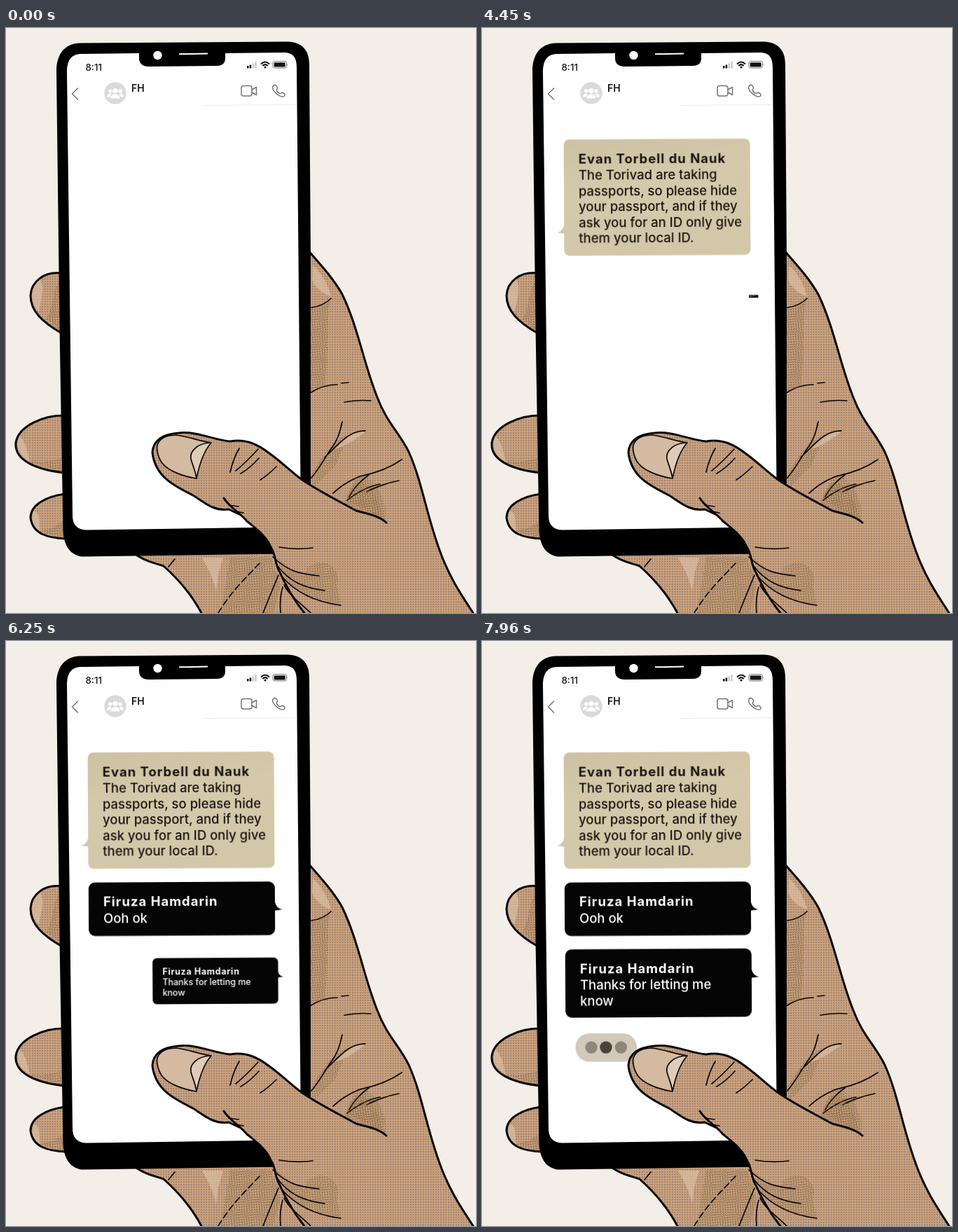
An HTML page for the animation above (8 s loop, 671 by 835 pixels).

```html
<!DOCTYPE html>
<html lang="en">
<head>
<meta charset="utf-8">
<title>Chat on a phone</title>
<style>
html, body { margin: 0; width: 100%; height: 100%; overflow: hidden; background: #f3eee7; }
svg { display: block; width: 100vw; height: 100vh; font-family: Inter, "Open Sans", sans-serif; }
.ink { fill: none; stroke: #080606; stroke-width: 3; stroke-linecap: round; stroke-linejoin: round; }
.thin { stroke-width: 1.7; }
.icon { fill: none; stroke: #77736f; stroke-width: 1.5; stroke-linejoin: round; stroke-linecap: round; }
.skin { fill: url(#skin); }
.shade { fill: url(#shade); }
.light { fill: #d8bda2; opacity: .75; }
.msg { font-size: 18.5px; font-weight: 500; }
.name { font-size: 18.5px; font-weight: 700; letter-spacing: 1px; }

.pop { animation: 8s linear infinite; }
#first { transform-origin: 107px 291px; animation-name: first; }
#second { transform-origin: 395px 383px; animation-name: second; }
#third { transform-origin: 396px 479px; animation-name: third; }
#typing { transform-origin: 134px 580px; animation-name: typing; }

@keyframes first {
  0% { transform: scale(0); animation-timing-function: step-end; }
  3.375% { transform: scale(.05); animation-timing-function: steps(3); }
  4.5% { transform: scale(.511); animation-timing-function: steps(3); }
  5.625%, 100% { transform: scale(1); }
}
@keyframes second {
  0% { transform: scale(0); animation-timing-function: step-end; }
  55.625% { transform: scale(.05); animation-timing-function: steps(3); }
  56.75% { transform: scale(.511); animation-timing-function: steps(3); }
  57.875%, 100% { transform: scale(1); }
}
@keyframes third {
  0% { transform: scale(0); animation-timing-function: step-end; }
  76.625% { transform: scale(.05); animation-timing-function: steps(3); }
  77.75% { transform: scale(.511); animation-timing-function: steps(3); }
  78.875%, 100% { transform: scale(1); }
}
@keyframes typing {
  0% { transform: scale(0); animation-timing-function: step-end; }
  97.625% { transform: scale(.05); animation-timing-function: steps(5); }
  99.5%, 100% { transform: scale(1); }
}
</style>
</head>
<body>
<svg viewBox="0 0 671 835" preserveAspectRatio="none">
  <defs>
    <pattern id="skin" width="3.6" height="3.6" patternUnits="userSpaceOnUse">
      <rect width="3.6" height="3.6" fill="#cba380"/>
      <circle cx="1.8" cy="1.8" r=".95" fill="#8c6d5d"/>
    </pattern>
    <pattern id="shade" width="5" height="5" patternUnits="userSpaceOnUse" patternTransform="rotate(35)">
      <path d="M0 1.2H3M2.5 3.7H5" stroke="#86683f" stroke-width="1.6" opacity=".7"/>
    </pattern>
    <linearGradient id="sand" x2=".3" y2="1">
      <stop offset="0" stop-color="#cdc1a3"/>
      <stop offset=".45" stop-color="#d5c9ab"/>
      <stop offset="1" stop-color="#d3c7a9"/>
    </linearGradient>
  </defs>
  <rect width="671" height="835" fill="#f3eee7"/>

  <!-- palm behind the phone -->
  <path class="skin" d="M431 317C449 338 467 357 480 380C503 428 511 480 530 527C543 562 561 577 575 605C594 647 600 695 620 748C633 784 650 809 667 835H279C264 807 243 784 225 768C212 763 202 763 186 752L380 700Z"/>
  <path class="shade" d="M434 398C445 398 455 394 462 390C457 420 462 460 455 512L434 520Z M500 640C515 635 520 645 530 655C540 675 545 690 541 704L485 672Z M320 755H378L392 795L382 835H306Z M434 642C450 610 470 585 490 580L470 625L440 655Z"/>
  <path class="light" d="M438 338C452 352 460 367 464 383C453 380 443 372 437 360Z M280 756H310L303 780L300 804C296 785 288 770 280 756Z M470 601C486 581 500 576 512 577C495 590 484 597 470 601Z"/>
  <path class="ink" d="M431 317C449 338 467 357 480 380C503 428 511 480 530 527C543 562 561 577 575 605C594 647 600 695 620 748C633 784 650 809 667 835M279 835C264 807 243 784 225 768C212 763 202 763 186 752"/>
  <path class="ink thin" d="M436 399C450 397 458 392 464 386M434 521C449 511 461 509 473 509M479 507L489 506M483 534C499 531 510 531 521 532M480 562C476 580 473 588 466 598C457 610 450 625 436 642M513 575C490 574 475 594 455 613M565 616C545 630 525 636 505 640C485 648 475 657 467 664M518 638C508 645 497 656 490 669M534 651C517 654 500 664 487 674M561 646C545 649 526 656 515 662M232 769L241 758"/>
  <path class="ink thin" stroke-dasharray="9 5" d="M362 764C342 785 320 806 303 835"/>

  <!-- fingers -->
  <g>
    <path class="skin" d="M80 350C54 347 36 362 35 382C35 404 52 420 80 436Z"/>
    <path class="skin" d="M82 553C55 553 18 567 14 592C12 616 40 630 84 635Z"/>
    <path class="skin" d="M84 665C56 669 35 681 35 699C38 722 59 728 86 729Z"/>
    <path class="shade" d="M80 360C65 365 70 400 57 415L80 434Z M82 612C62 620 45 619 32 619L82 634Z M84 700C73 713 58 716 48 719L84 728Z"/>
    <path class="light" d="M48 359C57 368 49 390 47 405C34 392 33 371 48 359Z M19 583C29 590 30 605 34 619C17 609 13 597 19 583Z M40 689C50 692 47 707 49 719C36 710 35 701 40 689Z"/>
    <path class="ink" d="M80 350C54 347 36 362 35 382C35 404 52 420 80 436M82 553C55 553 18 567 14 592C12 616 40 630 84 635M84 665C56 669 35 681 35 699C38 722 59 728 86 729"/>
  </g>

  <!-- phone -->
  <path d="M72 62C72 37 84 22 106 21.500L402 19.500C423 20 433 32 433 52L435 330V750L108 754.500C92 752 83 740 81.500 718L76.500 430Z"/>
  <path fill="#fff" d="M87 64C87 46 93 37 108 37L190 36V43C190 51 195 55 204 55L301 54C309 54 313 50 313 43V36L399 35C411 36 415 43 415 57L420.500 650V712L114 716.500C101 716 95 708 95 696L90 300Z"/>
  <circle cx="216.500" cy="39" r="6.200" fill="#fff"/>
  <path d="M247 37.300L288 36.500" stroke="#fff" stroke-width="2"/>

  <!-- status bar and header -->
  <g fill="#171513">
    <text x="113.500" y="61" font-size="13.300" font-weight="500">8:11</text>
    <text x="179" y="91" font-size="14" font-weight="600">FH</text>
    <path d="M344 54h2.500v3.500h-2.500zM347.700 52.500h2.500v5h-2.500z"/>
    <path fill="#c9c8c7" d="M351.500 50.500h2.500v7h-2.500zM355.300 48h2.500v9.500h-2.500z"/>
    <path fill="none" stroke="#171513" stroke-width="2" d="M364 51.500Q370 45.500 376 51.500M366.300 54Q370 50.300 373.700 54"/>
    <circle cx="370" cy="56" r="1.600"/>
    <rect x="381" y="47.500" width="19.500" height="9.500" rx="2.500" fill="none" stroke="#777"/>
    <rect x="382.700" y="49.200" width="16" height="6.200" rx="1.200"/>
    <path fill="#777" d="M401.500 50.500q1.500 1.700 0 3.500z"/>
  </g>
  <path class="icon" stroke-width="2" d="M102.500 86L94.500 94L102.500 102"/>
  <circle cx="156" cy="93" r="15.700" fill="#dadada"/>
  <g fill="#fff">
    <circle cx="156" cy="89.500" r="3.600"/>
    <circle cx="148.800" cy="90" r="2.700"/>
    <circle cx="163.200" cy="90" r="2.700"/>
    <path d="M149.500 100.500C149.500 92 162.500 92 162.500 100.500ZM144 98.500C144 93 149 93 150.500 94.500L148.500 98.500ZM168 98.500C168 93 163 93 161.500 94.500L163.500 98.500Z"/>
  </g>
  <g class="icon">
    <rect x="336" y="82.500" width="15" height="14.500" rx="3"/>
    <path d="M351 88L357.500 84.500V95.500L351 92"/>
    <path d="M381.500 82.500C384 80 386 82 387.500 85C388 87 385.500 87.500 386.500 89.500C388 92 390 93.500 391.500 93.500C393 93.500 393.500 91.500 395.500 92.500C398 94 399 96 397 97.500C392 101 377 88 381.500 82.500Z"/>
  </g>
  <path d="M283 110.500L413 109.500" stroke="#ecebea"/>

  <!-- messages -->
  <g id="first" class="pop">
    <g transform="rotate(-.3 250 242)">
      <rect x="117" y="158.500" width="266" height="166" rx="8" fill="url(#sand)"/>
      <path d="M118 276C117 285 113 290 107 291.500L119 293Z" fill="#d3c7a9"/>
      <g fill="#17130f">
        <text class="name" x="138" y="193.300">Evan Torbell du Nauk</text>
        <g class="msg">
          <text x="138" y="216">The Torivad are taking</text>
          <text x="138" y="238.500">passports, so please hide</text>
          <text x="138" y="261">your passport, and if they</text>
          <text x="138" y="283.500">ask you for an ID only give</text>
          <text x="138" y="306">them your local ID.</text>
        </g>
      </g>
    </g>
  </g>
  <g id="second" class="pop">
    <g transform="rotate(-.3 250 382)">
      <rect x="118" y="344" width="266" height="76.500" rx="9" fill="#050505"/>
      <path d="M383 368C384 378 388 383 395 384L383 385.500Z" fill="#050505"/>
      <g fill="#fff">
        <text class="name" x="139" y="378.300">Firuza Hamdarin</text>
        <text class="msg" x="139" y="401.500">Ooh ok</text>
      </g>
    </g>
  </g>
  <g id="third" class="pop">
    <g transform="rotate(-.3 250 488)">
      <rect x="119" y="439.500" width="266" height="97.500" rx="9" fill="#050505"/>
      <path d="M384 464C385 474 389 479 396 480L384 481.500Z" fill="#050505"/>
      <g fill="#fff">
        <text class="name" x="140" y="474">Firuza Hamdarin</text>
        <text class="msg" x="140" y="496.800">Thanks for letting me</text>
        <text class="msg" x="140" y="519.500">know</text>
      </g>
    </g>
  </g>
  <g id="typing" class="pop">
    <rect x="133.500" y="560" width="87.500" height="40.500" rx="20" fill="#d3c9bb"/>
    <circle cx="156" cy="580" r="8.700" fill="#8e857b"/>
    <circle cx="177" cy="580" r="8.700" fill="#4a423b"/>
    <circle cx="198.500" cy="580" r="8.700" fill="#8e857b"/>
  </g>

  <!-- thumb over the phone -->
  <path class="skin" d="M209 606C210 589 222 580 246 578C273 575 296 588 320 590C344 586 360 595 376 607C394 620 409 635 423 645C448 662 475 675 500 689C519 694 533 697 543 706L600 835H426C409 814 399 795 391 777C383 763 386 749 373 732C363 716 345 711 335 695L318 687C296 690 283 677 267 667C241 654 213 641 209 606Z"/>
  <path class="shade" d="M386 755C410 775 425 785 447 790C460 800 470 813 478 824C450 825 420 805 400 790Z M430 770C450 755 475 765 474 790C470 805 480 815 478 824L420 800Z M497 650C512 642 532 665 540 704C522 696 500 690 482 680Z"/>
  <path fill="#d3baa1" d="M216 604C213 590 224 581 243 581C260 583 277 590 293 592C284 602 277 618 272 643C254 640 232 633 223 621C219 616 217 610 216 604Z"/>
  <path fill="#e0ccb6" d="M293 592C274 592 262 604 264 615C266 624 270 629 272 643C277 618 284 602 293 592Z"/>
  <path class="ink" d="M335 695L318 687C296 690 283 677 267 667C241 654 213 641 209 606C210 589 222 580 246 578C273 575 296 588 320 590C344 586 360 595 376 607C394 620 409 635 423 645C448 662 475 675 500 689C519 694 533 697 543 706M311 671C319 684 333 691 344 704C356 714 372 725 378 741C386 752 383 764 391 777C399 795 409 814 426 835"/>
  <path class="ink thin" d="M243 581C224 581 213 590 216 604C217 610 219 616 223 621C232 633 254 640 272 643C277 618 284 602 293 592C277 590 260 583 243 581M293 592C274 592 262 604 264 615C266 624 270 629 272 643"/>
  <path class="ink thin" d="M333 600C327 610 323 621 320 634M360 601C348 614 339 623 328 632M361 614C354 622 347 629 335 636M386 626C378 634 371 640 363 645M318 681L332 683M328 690L339 692M390 741C407 744 423 744 438 742M381 755C404 777 421 779 447 782M387 767C405 791 426 799 455 803M393 782C416 809 447 820 478 824M397 795C405 811 422 822 435 835M389 781C381 800 374 817 367 835M395 798C391 811 391 823 392 835"/>
</svg>
</body>
</html>
```
